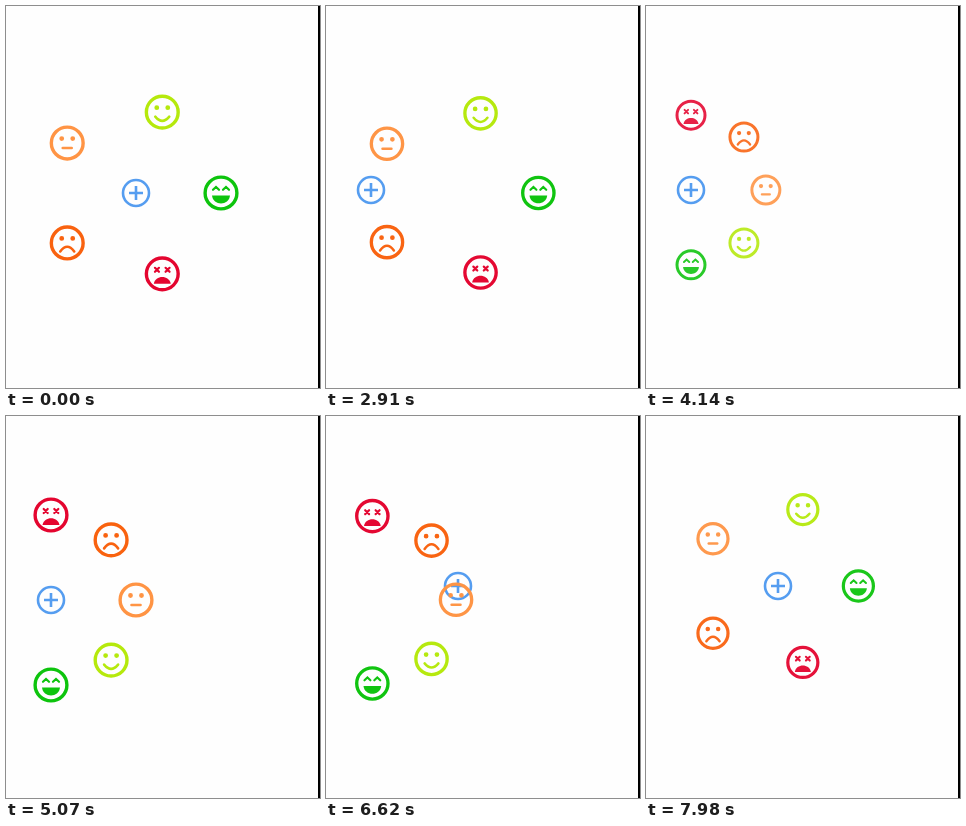
Recreate the animation shown at these times as an HTML page. Size 314x382 px, loop 8000 ms.

```html
<!DOCTYPE html>
<html lang="en">
<head>
<meta charset="utf-8">
<title>Mood menu</title>
<style>
  html, body { margin: 0; width: 100%; height: 100%; overflow: hidden; background: #fefefe; }
  svg { display: block; width: 314px; height: 382px; }
</style>
</head>
<body>
<svg viewBox="0 0 314 382" fill="none" stroke-width="2.6">
  <g id="plus" stroke="#559df0">
    <circle r="13"/>
    <path d="M-7 0H7M0-7V7"/>
  </g>
  <g id="faces" stroke-linecap="round"></g>
  <path d="M313 0V382" stroke="#000" stroke-width="2"/>
</svg>
<script>
const LOOP = 8000, RADIUS = 85;

const dots = '<path d="M-5.5-4.5h0M5.5-4.5h0" stroke-width="4.8"/>';
const cross = x => `M${x - 2}-6l4 4m0-4l-4 4`;
const solid = d => `<path d="${d}" fill="currentColor" stroke="none"/>`;

// Each face: colour, features, angle on the full ring, angle on the half ring.
const faces = [
  ['#0dc40d', '<path d="M-8-3.2l3-2.8 3 2.8M2-3.2l3-2.8 3 2.8" stroke-width="2.2"/>'
    + solid('M-9 2.5H9C8 13-8 13-9 2.5Z'), 0, 90],
  ['#b5e90c', dots + '<path d="M-7 4.5Q0 13 7 4.5"/>', -72, 45],
  ['#ff9444', dots + '<path d="M-4.5 5H4.5"/>', -144, 0],
  ['#f9620f', dots + '<path d="M-7 8.5Q0-1 7 8.5"/>', 144, -45],
  ['#e4052f', `<path d="${cross(-5.3)}${cross(5.3)}" stroke-width="2.2"/>`
    + solid('M-8.5 10C-7 1 7 1 8.5 10Z'), 72, -90],
];

const plus = document.getElementById('plus');
const ring = document.getElementById('faces');
ring.innerHTML = faces.map(([color, features]) =>
  `<g color="${color}" stroke="${color}"><circle r="15.9" stroke-width="3.4"/>${features}</g>`).join('');

const mix = (a, b, k) => a + (b - a) * k;
const mixPoint = (a, b, k) => [mix(a[0], b[0], k), mix(a[1], b[1], k)];
const span = (t, start, length) => Math.min(1, Math.max(0, (t - start) / length));
const easeInOut = u => (1 - Math.cos(Math.PI * u)) / 2;
const easeOut = u => 1 - (1 - u) ** 3;

const middle = [130, 187], grabbed = [132, 187], left = [45, 184], dropped = [132, 170];

function plusAt(t) {
  if (t < 1870) return middle;
  if (t < 5440) return mixPoint(grabbed, left, easeInOut(span(t, 1870, 930)));
  return mixPoint(left, dropped, easeInOut(span(t, 5440, 960)));
}

function orbit(center, degrees, radius) {
  const a = degrees * Math.PI / 180;
  return [center[0] + Math.cos(a) * radius, center[1] + Math.sin(a) * radius];
}

// The ring collapses into the moved button, then reopens around it.
function faceAt(t, full, half) {
  const second = t >= 5440;
  const target = second ? dropped : left;
  const [before, after] = second ? [half, full] : [full, half];
  const time = second ? t - 3710 : t;
  if (time < 3557) {
    const size = 1 - easeInOut(span(time, 2860, 640));
    const rest = orbit(second ? left : middle, before, RADIUS);
    return [mixPoint(target, rest, size), size];
  }
  const size = easeOut(span(time, 3557, 1150));
  return [orbit(target, after, RADIUS * size), size];
}

function draw(now) {
  const t = now % LOOP;
  plus.setAttribute('transform', `translate(${plusAt(t)})`);
  faces.forEach(([, , full, half], i) => {
    const [point, size] = faceAt(t, full, half);
    const face = ring.children[i];
    face.setAttribute('transform', `translate(${point}) scale(${size})`);
    face.setAttribute('opacity', size);
  });
  requestAnimationFrame(draw);
}
draw(0);
</script>
</body>
</html>
```
